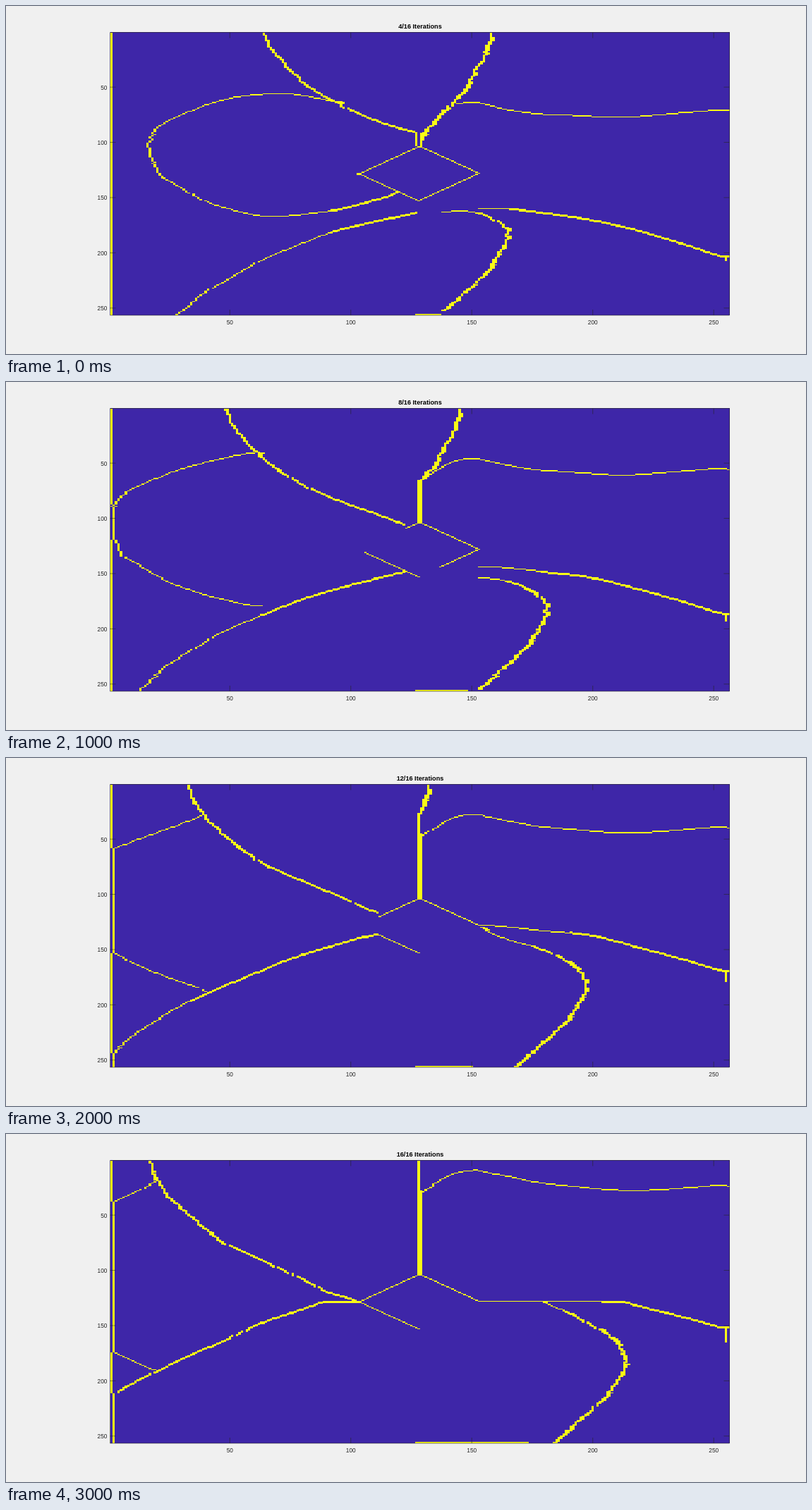
These frames come from a looping animation (1134 by 494 pixels, 4000 ms). An HTML page:

```html
<!DOCTYPE html>
<html lang="en">
<head>
<meta charset="utf-8">
<title>Iterations</title>
<style>
html, body { margin: 0; width: 100%; height: 100%; overflow: hidden; background: #f0f0f0; }
svg { display: block; width: 1134px; height: 494px; }
text { font: 8.33px "Liberation Sans", Arial, sans-serif; fill: #262626; }
#title { font-size: 9.17px; font-weight: bold; fill: #000; text-anchor: middle; }
</style>
</head>
<body>
<svg viewBox="0 0 1134 494">
  <rect width="1134" height="494" fill="#f0f0f0"/>
  <rect x="148" y="37" width="878" height="402" fill="#3e26a8"/>
  <path id="cells" fill="#f9fb15" shape-rendering="crispEdges"/>
  <path id="axes" fill="none" stroke="#262626" stroke-width=".6"/>
  <g id="labels"></g>
  <text id="title" x="587" y="32.3"></text>
</svg>
<script>
const N = 256, L = 147.5, T = 37.5, CW = 878 / N, CH = 401.5 / N;
const MID = 237.5, LEFT = 152, CENTRE = 585;
const byId = id => document.getElementById(id);
const noise = n => { const v = Math.sin(n * 127.1 + 3.7) * 43758.5453; return v - Math.floor(v); };
const col = x => Math.floor((x - L) / CW);
const rowOf = y => Math.floor((y - T) / CH);

// Where moving curves meet the fixed edges at each step
const JOIN = [584, 566, 530, 500];
const LOOP_END = [557, 367, 285, 214];
const BULGE_START = [618, 667, 670, 740];
const BAR_TOP = [180, 140, 106, 80];
const FLOOR_END = [620, 656, 665, 741];

// Each point is [x, y, rise per step]; dx is the sideways drift per step.
// A curve is two cells thick to the right of heavy(k).
const curves = [
  { // descending to the left corner of the diamond
    dx: -54,
    pts: [[368, 30, 0], [369, 46, 0], [388, 74, 3], [424, 110, 2], [465, 135, 5], [500, 152, 5],
      [536, 167, 5.5], [582, 180, 8.5], [620, 192, 11], [640, 201, 10], [668, 209, 10]],
    hi: k => JOIN[k], heavy: () => 0
  },
  { // closed loop on the left
    dx: -54, minX: LEFT,
    pts: [[480, 138, -20], [425, 128, -26], [400, 125, -24], [355, 126, -16], [305, 134, -11],
      [255, 152, -10], [218, 170, -8], [205, 190, -4], [203, 203, 0], [216, 238, 4], [230, 247, 5],
      [285, 278, 6], [345, 295, 9.5], [378, 299, 13], [410, 297, 20], [465, 290, 20],
      [500, 282, 0], [545, 269, 0], [558, 263, 0]],
    hi: k => LOOP_END[k], heavy: () => 463
  },
  { // lower left arm
    dx: -54, minX: LEFT, minY: MID,
    pts: [[668, 278, -17], [640, 282, -16], [612, 287, -16], [584, 293, -15], [515, 308, -12],
      [465, 320, -8], [410, 341, -7], [355, 364, -6], [315, 388, -6], [280, 408, -4],
      [245, 437, 0], [190, 480, 0]],
    hi: k => JOIN[k], heavy: k => 463 - 100 * k
  },
  { // upper right curve, pressed against the centre bar
    dx: -44, minX: CENTRE, rough: true,
    pts: [[690, 30, 0], [684, 55, 0], [676, 75, 0], [661, 98, 0], [655, 112, 0], [640, 130, 0],
      [610, 160, 0], [594, 180, 0], [590, 190, 0]],
    heavy: () => 0
  },
  { // rising branch on the right
    dx: 0,
    pts: [[588, 168, -28], [613, 152, -28], [637, 140, -28], [664, 137, -28.5], [685, 141, -28.5],
      [715, 148, -29], [755, 153, -28], [800, 155, -27], [870, 158, -26], [930, 154, -25],
      [1008, 148, -25], [1028, 150, -25]],
    lo: k => k ? 0 : 638, heavy: () => 2000
  },
  { // lower right arm, flattened on the middle line
    dx: 0, minY: MID,
    pts: [[668, 288, -26], [712, 288, -24], [770, 295, -24.5], [830, 304, -26], [900, 320, -25],
      [960, 338, -26], [1012, 355, -27], [1028, 355, -27]],
    heavy: k => 715 + 43 * k
  },
  { // lower right bulge
    dx: 55.5, minY: MID, rough: true,
    pts: [[560, 288, -24], [590, 290, -18], [618, 293, -15], [640, 291, -11], [670, 294, -6.5],
      [700, 307, -4], [711, 322, 0], [700, 350, 0], [680, 378, -1], [652, 405, -1.5],
      [615, 437, -1], [600, 450, 0]],
    lo: k => BULGE_START[k], heavy: k => 670 + 40 * k
  }
];

let grid;
function put(c, r) {
  if (c >= 0 && r >= 0 && c < N && r < N) grid.add(r * N + c);
}
function bar(c, y0, y1) {
  for (let r = Math.round((y0 - T) / CH); r < (y1 - T) / CH; r++) put(c, r);
}

// Catmull-Rom curve through the points
function smooth(pts) {
  const out = [], steps = 12;
  const at = i => pts[Math.max(0, Math.min(pts.length - 1, i))];
  for (let i = 0; i < pts.length - 1; i++)
    for (let s = 0; s < steps; s++) {
      const t = s / steps;
      out.push([0, 1].map(n => {
        const [a, b, c, d] = [-1, 0, 1, 2].map(j => at(i + j)[n]);
        return b + t / 2 * (c - a + t * (2 * a - 5 * b + 4 * c - d + t * (3 * (b - c) + d - a)));
      }));
    }
  out.push(at(pts.length));
  return out;
}

// Steps along the longer axis in cell units
function walk([xa, ya], [xb, yb], stamp) {
  const x0 = (xa - L) / CW, y0 = (ya - T) / CH;
  const dx = (xb - xa) / CW, dy = (yb - ya) / CH;
  const steep = Math.abs(dy) > Math.abs(dx);
  const a = steep ? y0 : x0, d = steep ? dy : dx;
  if (!d) return;
  const end = Math.floor(Math.max(a, a + d) - .5);
  for (let i = Math.ceil(Math.min(a, a + d) - .5); i <= end; i++) {
    const t = (i + .5 - a) / d;
    stamp(x0 + dx * t, y0 + dy * t, steep);
  }
}

function drawCurve(curve, k) {
  const { dx, pts, minX = 0, minY = 0, rough, heavy } = curve;
  const lo = curve.lo ? curve.lo(k) : 0, hi = curve.hi ? curve.hi(k) : 2000;
  const heavyCol = col(heavy(k)), minCol = col(minX);
  const path = smooth(pts.map(([x, y, dy]) => [x + dx * k, y + dy * k]))
    .map(([x, y]) => [Math.max(x, minX), Math.max(y, minY)]);
  const inside = p => p[0] >= lo && p[0] <= hi;
  const stamp = (x, y, steep) => {
    const thick = x > heavyCol, r = thick ? Math.round(y - 1) : Math.floor(y);
    const free = steep && Math.floor(x) > minCol;
    const c = Math.max(minCol, Math.floor(x + (free ? noise(r >> 1) - .5 : 0)));
    put(c, r);
    if (thick) put(c, r + 1);
    if (rough && free && noise(r >> 2) > .45) put(c + 1, r);
  };
  for (let i = 1; i < path.length; i++)
    if (inside(path[i - 1]) && inside(path[i])) walk(path[i - 1], path[i], stamp);
}

function drawDiamond(k) {
  const upperLeft = col(k ? JOIN[k] : 499), lowerLeft = col([499, 511, 530, 500][k]);
  const lowerRight = col([588, 617, 671, 671][k]);
  for (let i = 0; i <= 25; i++) {
    const l = 127 - i, r = 128 + i;
    if (l >= upperLeft) put(l, 103 + i);
    if (l >= lowerLeft) put(l, 152 - i);
    if (i < 25) put(r, 103 + i);
    if (i < 25 && r >= lowerRight) put(r, 151 - i);
  }
}

function drawBars(k) {
  bar(k ? 127 : 126, BAR_TOP[k], 199);
  bar(128, BAR_TOP[k], 199);
  const hook = 355 - 27 * k;
  bar(254, hook, hook + 6 + 5.3 * k);
  for (let c = col(582); c < col(FLOOR_END[k]); c++) put(c, N - 1);
  // the left border shows wherever no curve is pressed against it
  for (let r = 0; r < N; r++) if (!grid.has(r * N + 1)) put(0, r);
}

function buildScene(k) {
  grid = new Set();
  for (const curve of curves) drawCurve(curve, k);
  drawDiamond(k);
  drawBars(k);
  const px = c => Math.round(L + c * CW), py = r => Math.round(T + r * CH);
  let d = "";
  for (const id of grid) {
    const c = id % N, r = (id - c) / N;
    d += `M${px(c)} ${py(r)}H${px(c + 1)}V${py(r + 1)}H${px(c)}Z`;
  }
  return { d, title: `${4 * (k + 1)}/16 Iterations` };
}

function drawAxes() {
  const R = L + 878, B = T + 401.5;
  let d = `M${L} ${T}H${R}V${B}H${L}Z`, labels = "";
  for (let v = 50; v <= 250; v += 50) {
    const x = L + (v - .5) * CW, y = T + (v - .5) * CH;
    d += `M${x} ${B}v-8M${x} ${T}v8M${L} ${y}h8M${R} ${y}h-8`;
    labels += `<text x="${x}" y="451.5" text-anchor="middle">${v}</text>`;
    labels += `<text x="143.5" y="${y + 3.5}" text-anchor="end">${v}</text>`;
  }
  byId("axes").setAttribute("d", d);
  byId("labels").innerHTML = labels;
}

const scenes = [0, 1, 2, 3].map(buildScene);
let shown = -1;
function render(ms) {
  const k = Math.floor(ms % 4000 / 1000);
  if (k === shown) return;
  shown = k;
  byId("cells").setAttribute("d", scenes[k].d);
  byId("title").textContent = scenes[k].title;
}

drawAxes();
const start = performance.now();
(function tick() {
  render(performance.now() - start);
  requestAnimationFrame(tick);
})();
</script>
</body>
</html>
```
